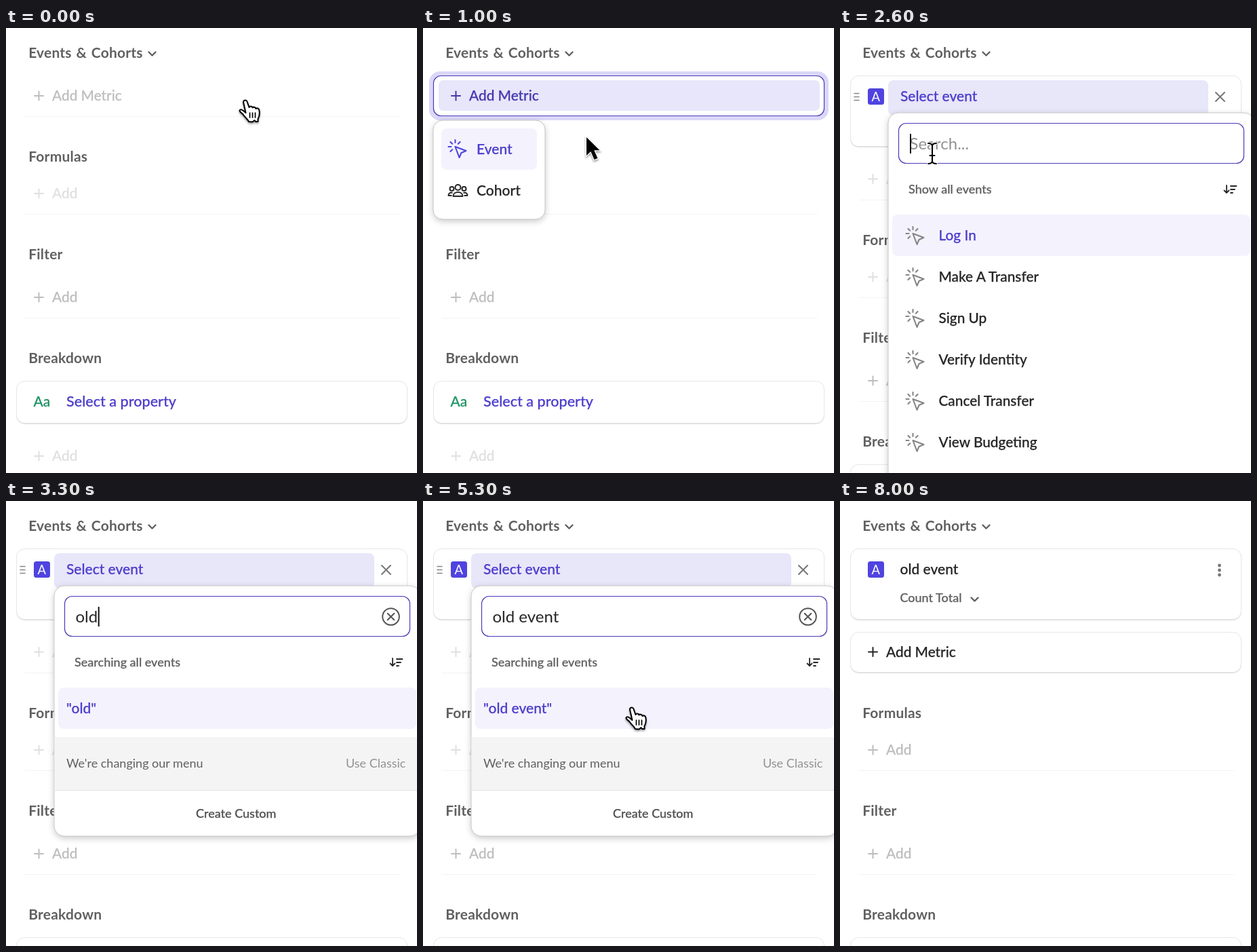
These frames come from a looping animation (606 px wide and 656 px high, 8.5 s). An HTML page:

```html
<!DOCTYPE html>
<html lang="en">
<head>
<meta charset="utf-8">
<title>Adding a metric</title>
<style>
  html, body { margin: 0; width: 100%; height: 100%; overflow: hidden; background: #fff; }
  svg { display: block; width: 606px; height: 656px; font-family: Lato, "Open Sans", sans-serif; }
  text { white-space: pre; }
  .title { letter-spacing: .2px; word-spacing: 1.5px; }
  .card { filter: drop-shadow(0 1px .6px #0002); }
  .menu { filter: drop-shadow(0 3px 5px #0003); }
  .pointer { filter: drop-shadow(0 2px 1.5px #0006); }
</style>
</head>
<body>
<svg id="stage" viewBox="0 0 606 656"></svg>
<script>
const stage = document.getElementById('stage');
const ruler = document.createElement('canvas').getContext('2d');
const LOOP = 8500, STEP = 100, SHIFT = 123;
const PURPLE = '#4f44e0', INK = '#4d3fcc', DARK = '#262626', GREY = '#606060', PALE = '#bebebe', FAINT = '#e0e0e0';

// Drawing helpers
const text = (x, y, s, fill, size = 21, weight = 500) =>
  `<text x="${x}" y="${y}" fill="${fill}" font-size="${size}" font-weight="${weight}"` +
  (weight === 500 ? ` stroke="${fill}" stroke-width=".25"` : '') + `>${s}</text>`;
const rect = (x, y, w, h, r, fill, extra = '') =>
  `<rect x="${x}" y="${y}" width="${w}" height="${h}" rx="${r}" fill="${fill}" ${extra}/>`;
const line = (d, color, width = 2) =>
  `<path d="${d}" fill="none" stroke="${color}" stroke-width="${width}" stroke-linecap="round" stroke-linejoin="round"/>`;
const at = (x, y, s, extra = '') => `<g transform="translate(${x} ${y})" ${extra}>${s}</g>`;
const card = (y, h) => rect(15.5, y + .5, 576, h - 1, 12, '#fff', 'stroke="#e6e6e6" class="card"');
const rule = y => line(`M28 ${y + .5}H581`, '#f3f3f3', 1);
const chevron = (x, y) => at(x, y, line('M-5-2.5L0 2.5L5-2.5', GREY, 2.4));
const cross = (x, y, r, color) => at(x, y, line(`M${-r} ${-r}L${r} ${r}M${r} ${-r}L${-r} ${r}`, color));
const add = (y, color, label = 'Add') =>
  at(48.5, y, line('M-6.5 0H6.5M0-6.5V6.5', color)) + text(68, y + 7, label, color, 20.8);
const title = (y, s) => `<g class="title">${text(33.2, y + 7, s, GREY, 21, 700)}</g>`;

const clickIcon = (x, y, color) => {
  const rays = [-45, -90, -135, 180, 135].map(a => {
    const c = Math.cos(a * Math.PI / 180), s = Math.sin(a * Math.PI / 180);
    return `M${-3 + 6 * c} ${-3 + 6 * s}L${-3 + 10 * c} ${-3 + 10 * s}`;
  }).join('');
  return at(x, y, line(rays + 'M-3-3L13 3L6 6L3 13Z', color, 2.1));
};

const cohortIcon = (x, y) => {
  const side = '<circle cx="9" cy="-3" r="3"/><path d="M8 3C12 2 14 4 14 7H9"/>';
  return at(x, y, `<circle cy="-5" r="4"/><path d="M-7 8C-7 0 7 0 7 8Z"/>${side}<g transform="scale(-1 1)">${side}</g>`,
    `fill="none" stroke="${DARK}" stroke-width="2" stroke-linejoin="round"`);
};

const badge = () => rect(41, 89, 24, 24, 3.5, PURPLE) + text(46.6, 107.5, 'A', '#fff', 18.5, 400);

// Pointers, each drawn around its hot spot
const BEAM = 'M-6-15C-2-15 0-14 0-11C0-14 2-15 6-15M0-11V11M-6 15C-2 15 0 14 0 11C0 14 2 15 6 15M-3.5 3H3.5';
const pointers = {
  none: '',
  arrow: '<path class="pointer" d="M0 0V27L6.3 21L11.5 33L16.5 31L11.3 19.3H19.5Z" stroke="#fff" stroke-width="2.4" paint-order="stroke"/>',
  beam: line(BEAM, '#fff', 4) + line(BEAM, '#000', 2),
  hand: `<path class="pointer" fill="#fff" stroke="#000" stroke-width="2" stroke-linejoin="round"
    d="M-3 2.5C-3-1 1.5-1.5 2.5 1.5L5.5 10C6 8 10 8 10.5 10.5C11.5 9 15 9.5 15.5 12C17 10.5 20 11.5 20.3 14
    C21.5 20 21 23 18.5 27V31H15L13.5 29L10.5 31.5L5 31C3.5 28-1 24-3 21C-4 19-9 17-8.5 14.5C-7.5 12-4 13.5 .5 18Z"/>`
    + line('M6.5 18V25M10.5 18V25M14.5 18V25', '#000', 1.7)
};

const path = [
  [0, 353, 107, 'hand'], [800, 353, 107, 'hand'], [900, 315, 132, 'arrow'], [1000, 241, 161, 'arrow'],
  [1100, 170, 178, 'arrow'], [1200, 136, 185, 'hand'], [1400, 136, 185, 'beam'], [2800, 136, 185, 'none'],
  [4900, 136, 185, 'beam'], [5000, 200, 205, 'arrow'], [5100, 290, 262, 'arrow'], [5200, 330, 314, 'hand'],
  [5300, 308, 305, 'hand'], [5400, 292, 316, 'hand'], [5500, 290, 318, 'hand'], [5600, 290, 318, 'arrow'],
  [6700, 290, 318, 'arrow'], [7000, 311, 315, 'arrow'], [7100, 311, 315, 'arrow'], [7300, 413, 628, 'arrow'],
  [7400, 413, 656, 'none'], [LOOP, 413, 656, 'none']
];
// Time and number of characters typed
const typing = [[0, 0], [2800, 1], [2900, 2], [3100, 3], [3900, 4], [4200, 5], [4500, 7], [4700, 8], [4800, 9]];
const events = ['Log In', 'Make A Transfer', 'Sign Up', 'Verify Identity', 'Cancel Transfer', 'View Budgeting'];

const ramp = (t, a, b) => Math.min(1, Math.max(0, (t - a) / (b - a)));
const lastBefore = (keys, t) => keys.findLastIndex(k => k[0] <= t);

function pointer(t) {
  const i = lastBefore(path, t), [t0, x0, y0, kind] = path[i], [t1, x1, y1] = path[i + 1];
  const p = ramp(t, t0, t1);
  return at(x0 + (x1 - x0) * p, y0 + (y1 - y0) * p, pointers[kind]);
}

// Formulas, Filter and Breakdown
const sections = (formula, filter) =>
  title(190, 'Formulas') + add(244, formula) + rule(274) +
  title(334, 'Filter') + add(397, filter) + rule(427) +
  title(487, 'Breakdown') + card(520, 63) +
  text(40.5, 558, 'Aa', '#219464') + text(89, 558, 'Select a property', INK, 21.6) + add(631, FAINT);

function emptyQuery(t) {
  let s = sections(FAINT, PALE);
  if (t < 100) return s + add(100, PALE, 'Add Metric') + rule(130);
  if (t < 300) return s + card(70, 60) + add(100, DARK, 'Add Metric');
  s += rect(9, 64, 589, 72, 16, '#dad7f8') +
    rect(15.5, 70.5, 576, 59, 11, '#fff', 'stroke="#4a3db8" stroke-width="1.2"') +
    rect(23, 77, 562, 45, 7, '#e7e6fa') + add(100, '#4538ae', 'Add Metric');
  const choice = rect(15, 136, 165, 146, 14, '#fff', 'stroke="#c4c4c4" class="menu"') +
    rect(27, 148, 141, 61, 8, '#f4f2fd') + clickIcon(50.5, 178, PURPLE) + text(79, 186, 'Event', INK) +
    cohortIcon(51.5, 240) + text(79, 247, 'Cohort', DARK);
  return s + `<g opacity="${ramp(t, 300, 500)}">${choice}</g>`;
}

function searchField(t) {
  const [since, count] = typing[lastBefore(typing, t)], typed = 'old event'.slice(0, count);
  const caretOn = (t - Math.max(since, 1600)) % 1000 < 500;
  ruler.font = '24px Lato, "Open Sans", sans-serif';
  const caret = 104 + (typed && ruler.measureText(typed).width);
  return rect(86.5, 140.5, 509, 59, 11, '#fff', `stroke="#4a3db8" stroke-width="1.2" stroke-opacity="${ramp(t, 1600, 2000)}"`) +
    text(102.5, 179, typed || 'Search...', typed ? DARK : '#929292', 24, 400) +
    (caretOn ? rect(caret - 1, 156, 2, 29, 0, '#111') : '') +
    (typed ? '<circle cx="567.5" cy="170.5" r="12.3" fill="none" stroke="#555" stroke-width="2"/>' + cross(567.5, 170.5, 4.8, '#555') : '');
}

function eventMenu(t) {
  const found = t >= 3300;
  let s = rect(71, 125, 540, found ? 369 : 560, 15, '#fff', 'stroke="#c8c8c8" class="menu"') + searchField(t) +
    text(101, 244, found ? 'Searching all events' : 'Show all events', GREY, 18) +
    line('M570 232V243M566.5 239.5L570 243L573.5 239.5M576 233H584.5M576 238H582M576 243H579', DARK, 1.8) +
    rect(77, 275, 528, 61, 8, '#f4f2fd');
  if (!found) return s + events.map((name, i) =>
    clickIcon(110.5, 306 + 61 * i, '#858585') + text(145.5, 313 + 61 * i, name, i ? DARK : INK, 20.8)).join('');
  return s + text(89, 313, t < 5000 ? '"old"' : '"old event"', INK) +
    rect(71.5, 348, 540, 78, 0, '#f4f4f4') + line('M72 426.5H606', '#e4e4e4', 1) +
    text(89, 393, "We're changing our menu", GREY, 18, 400) + text(501, 393, 'Use Classic', '#929292', 18, 400) +
    text(280, 467, 'Create Custom', '#505050', 18);
}

function choosing(t) {
  return at(0, SHIFT, sections(FAINT, PALE)) + card(70, 105) +
    line('M21 96.5H28M21 101.5H28M21 106.5H28', '#888', 1.6) + badge() +
    rect(71, 77, 472, 52, 8, '#e8e6f9') + text(89, 108, 'Select event', INK) + cross(560.5, 101.5, 6.5, '#777') +
    add(222.5, FAINT, 'Add Metric') + rule(253) + eventMenu(t);
}

const chosen = () => at(0, SHIFT, sections(PALE, PALE)) + card(70, 105) + badge() +
  text(88.5, 108, 'old event', DARK) + text(88.5, 149, 'Count Total', GREY, 18) + chevron(198.5, 145) +
  [95, 102, 109].map(y => `<circle cx="559.5" cy="${y}" r="2.4" fill="#777"/>`).join('') +
  card(193, 60) + add(222.5, DARK, 'Add Metric');

const start = performance.now();
let shown = -1;
function draw() {
  const t = Math.floor((performance.now() - start) % LOOP / STEP) * STEP;
  if (t !== shown) {
    shown = t;
    const scene = t < 1400 ? emptyQuery : t < 5800 ? choosing : chosen;
    stage.innerHTML = title(37, 'Events &amp; Cohorts') + chevron(215.5, 38) + scene(t) + pointer(t);
  }
  requestAnimationFrame(draw);
}
draw();
</script>
</body>
</html>
```
